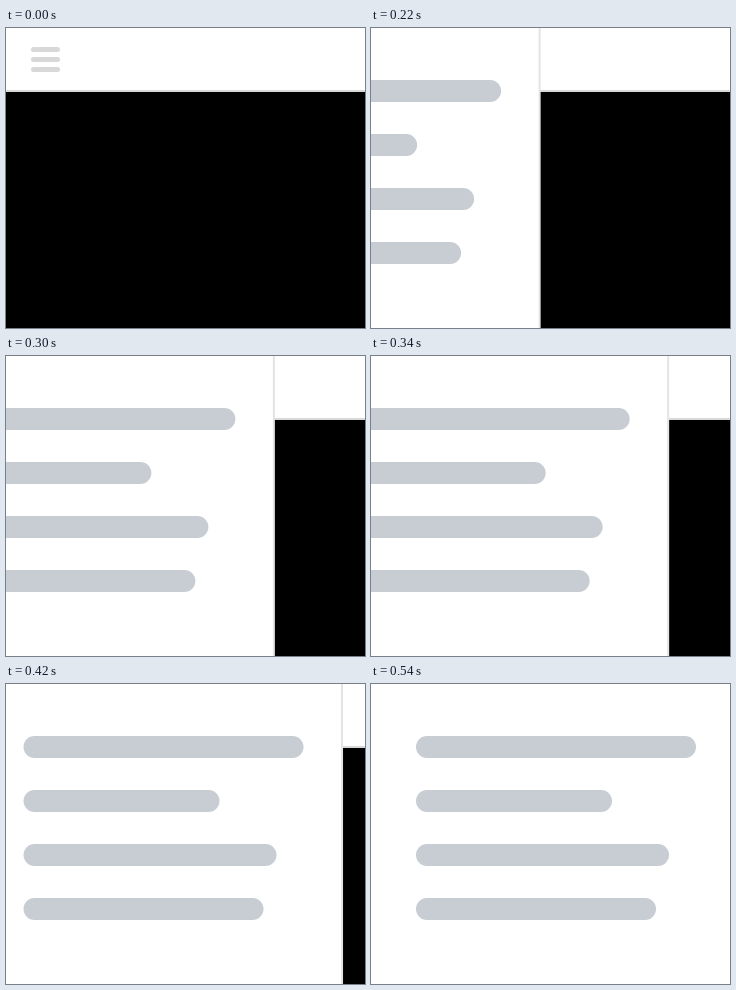
Animation of 359x300 px, one loop 1.54 s. Source, as an HTML page:

```html
<!DOCTYPE html>
<html lang="en">
<head>
<meta charset="utf-8">
<title>Sliding menu</title>
<style>
  html, body { margin: 0; width: 100%; height: 100%; overflow: hidden; background: #fff; }
  svg { display: block; }
</style>
</head>
<body>
<svg width="359" height="300" viewBox="0 0 359 300">
  <rect width="359" height="300" fill="#fff"/>
  <g fill="#d8d8d8">
    <rect x="25" y="19" width="29" height="5" rx="2.5"/>
    <rect x="25" y="29" width="29" height="5" rx="2.5"/>
    <rect x="25" y="39" width="29" height="5" rx="2.5"/>
    <rect y="62" width="359" height="2"/>
  </g>
  <rect y="64" width="359" height="236"/>
  <g id="menu" transform="translate(-400)">
    <rect width="364.5" height="300" fill="#e4e4e4"/>
    <rect width="362.5" height="300" fill="#fff"/>
    <g fill="#c8cdd4">
      <rect x="45" y="52" width="280" height="22" rx="11"/>
      <rect x="45" y="106" width="196" height="22" rx="11"/>
      <rect x="45" y="160" width="253" height="22" rx="11"/>
      <rect x="45" y="214" width="240" height="22" rx="11"/>
    </g>
  </g>
</svg>
<script>
const LOOP = 1540, STEP = 20, START = 180, DURATION = 360, TRAVEL = 363;
const menu = document.getElementById('menu');

// Remaining share of the travel: fast start, gentle finish.
function remaining(progress) {
  const q = Math.sqrt(progress);
  return (1 - q) * (1 - 0.491 * q - 0.28 * q * q);
}

function draw() {
  const time = Math.floor(performance.now() % LOOP / STEP) * STEP;
  const progress = Math.min(1, (time - START) / DURATION);
  const x = progress > 0 ? -TRAVEL * remaining(progress) : -400;
  menu.setAttribute('transform', `translate(${x})`);
  requestAnimationFrame(draw);
}
draw();
</script>
</body>
</html>
```
